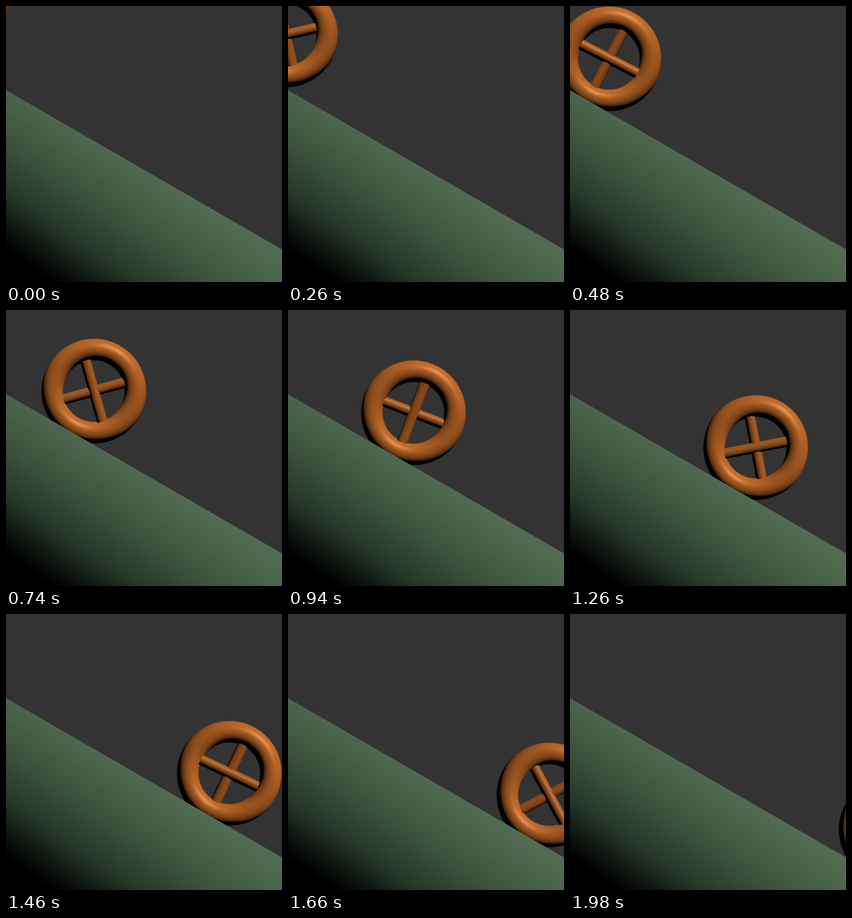
These frames come from a looping animation (500x500 px, 2 s). An HTML page with a canvas:

```html
<!DOCTYPE html>
<html>
<head>
<meta charset="utf-8">
<title>Wheel rolling down a ramp</title>
<style>
html, body { margin: 0; width: 100%; height: 100%; overflow: hidden; background: #333; }
canvas { display: block; }
</style>
</head>
<body>
<canvas id="stage" width="500" height="500"></canvas>
<script>
const ctx = document.getElementById('stage').getContext('2d');
const SIZE = 194, MID = SIZE / 2;
const RING = 75.3, TUBE = 19.5;           // torus radii
const SPOKE = 9.5, REACH = 57.5;          // spoke radius and half length
const wheel = document.createElement('canvas');
wheel.width = wheel.height = SIZE;
const wheelCtx = wheel.getContext('2d');
const image = wheelCtx.createImageData(SIZE, SIZE);

const unit = v => { const m = Math.hypot(...v); return v.map(c => c / m); };
const dot = (x, y, z, v) => x * v[0] + y * v[1] + z * v[2];

// The gradient axis leans a little away from the slope's normal.
const ramp = ctx.createLinearGradient(57, -82, -.57 * 365, .82 * 365);
const stop = (s, color) => ramp.addColorStop((s + 100) / 465, color);
stop(90, 'rgb(81,108,83)');
stop(127, 'rgb(75,101,77)');
stop(206, 'rgb(58,80,60)');
stop(275, 'rgb(39,55,42)');
stop(325, 'rgb(15,21,16)');
stop(363, '#000');

function drawWheel(cx, cy, turn) {
  // Perspective shifts the light slightly as the wheel crosses the view.
  const light = unit([.5 + (cx - 250) * .0008, -.7 + (cy - 250) * .0008, .6]);
  const half = unit([light[0], light[1], light[2] + 1]);
  const axes = [turn, turn + Math.PI / 2].map(a => [Math.cos(a), Math.sin(a)]);
  const data = image.data;
  for (let j = 0, p = 0; j < SIZE; j++) {
    for (let i = 0; i < SIZE; i++, p += 4) {
      const x = i + .5 - MID, y = j + .5 - MID, r = Math.hypot(x, y);
      let depth = -1, nx, ny, nz, alpha = 0, tone = 1;
      const gap = Math.abs(r - RING);
      if (gap < TUBE + .5) {
        const u = Math.max(-1, Math.min(1, (r - RING) / TUBE));
        nz = Math.sqrt(1 - u * u);
        nx = u * x / r;
        ny = u * y / r;
        depth = nz * TUBE;
        alpha = Math.min(1, TUBE + .5 - gap);
      }
      axes.forEach(([c, s], k) => {
        const along = Math.abs(x * c + y * s), v = (y * c - x * s) / SPOKE;
        if (along > REACH || Math.abs(v) > 1) return;
        const w = Math.sqrt(1 - v * v), z = w * SPOKE + k * 4;
        if (z < depth) return;
        depth = z;
        nx = -s * v;
        ny = c * v;
        nz = w;
        alpha = 1;
        tone = .9;
      });
      if (alpha) {
        const lit = tone * Math.sqrt(Math.max(0, dot(nx, ny, nz, light)));
        const shine = 45 * tone * Math.max(0, dot(nx, ny, nz, half)) ** 45;
        data[p] = 198 * lit + shine;
        data[p + 1] = 108 * lit + shine;
        data[p + 2] = 41 * lit + shine;
      }
      data[p + 3] = alpha * 255;
    }
  }
  wheelCtx.putImageData(image, 0, 0);
  ctx.drawImage(wheel, cx - MID, cy - MID);
}

function frame() {
  const t = Math.floor(performance.now() % 2000 / 20) * 20;
  const cx = -93 + .3408 * t;
  const cy = 147 + (cx - 159.5) * Math.tan(Math.PI / 6);
  ctx.fillStyle = '#333';
  ctx.fillRect(0, 0, 500, 500);
  drawWheel(cx, cy, Math.PI / 6 + t / 1980 * 2 * Math.PI);
  ctx.fillStyle = ramp;
  ctx.beginPath();
  ctx.moveTo(0, 152.5);
  ctx.lineTo(500, 441);
  ctx.lineTo(500, 500);
  ctx.lineTo(0, 500);
  ctx.fill();
  requestAnimationFrame(frame);
}
frame();
</script>
</body>
</html>
```
